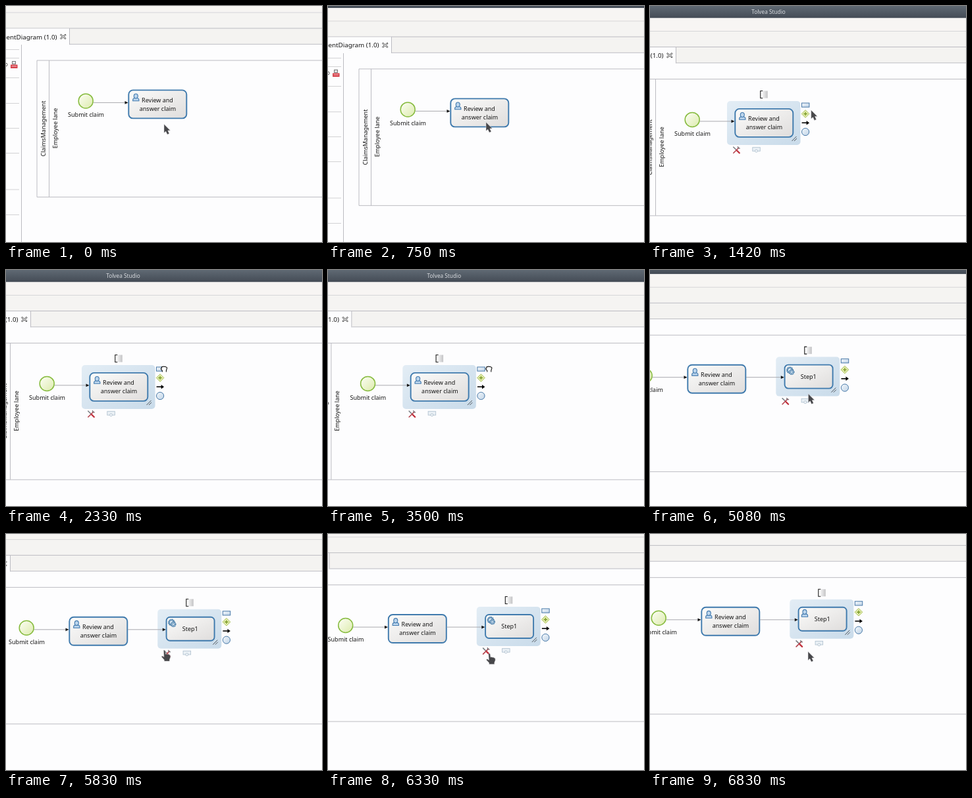
These frames come from a looping animation (480x360 px, 7910 ms). An HTML page:

```html
<!DOCTYPE html>
<html lang="en">
<head>
<meta charset="utf-8">
<title>Adding a step to a process diagram</title>
<style>
  html, body { margin: 0; width: 100%; height: 100%; overflow: hidden; background: #fdfdfe; }
  svg { display: block; width: 100vw; height: 100vh; }
  text { font: 9px "Noto Sans", "Open Sans", sans-serif; fill: #151515; text-anchor: middle; }
  .title { font-size: 8.25px; fill: #d9dce0; }
  .tab { font-size: 9.8px; text-anchor: end; }
  .rule { stroke: #bcbcc2; fill: none; }
  .pale { stroke: #d2d2d4; }
  .flow { stroke: #a9a9ae; }
  .task { fill: url(#taskFill); stroke: #3f7aad; stroke-width: 1.9; }
  .tool { fill: url(#toolFill); stroke: #4879a8; }
  .ghost { fill: #fafbfc; stroke: #b5cddd; stroke-width: 1.3; }
  .cursor { fill: #47474a; stroke: #e9e9ec; stroke-width: .5; stroke-linejoin: round; }
</style>
</head>
<body>
<svg viewBox="0 0 480 360" preserveAspectRatio="none">
  <defs>
    <linearGradient id="barFill" x2="0" y2="1">
      <stop stop-color="#606a74"/><stop offset="1" stop-color="#444b55"/>
    </linearGradient>
    <linearGradient id="taskFill" x2="1" y2="1">
      <stop stop-color="#fbfbfa"/><stop offset="1" stop-color="#dfdddc"/>
    </linearGradient>
    <linearGradient id="startFill" x2="1" y2="1">
      <stop stop-color="#fdfef6"/><stop offset="1" stop-color="#dcebac"/>
    </linearGradient>
    <linearGradient id="toolFill" x2="1" y2="1">
      <stop stop-color="#f4f8fc"/><stop offset="1" stop-color="#bfd3e6"/>
    </linearGradient>
    <linearGradient id="selFill" x2="1" y2="1">
      <stop stop-color="#e3edf5"/><stop offset="1" stop-color="#c9dbea"/>
    </linearGradient>
    <linearGradient id="noteFill" x2="1" y2="0">
      <stop stop-color="#f4f4f4"/><stop offset="1" stop-color="#c3c3c5"/>
    </linearGradient>

    <g id="user" fill="#bcd5ec" stroke="#4079ae" stroke-width="1.1">
      <path d="M-4.6 5.3V3.6Q-4.4 1.2-1.8 1H1.8Q4.4 1.2 4.6 3.6V5.3Z"/>
      <ellipse cy="-2" rx="3" ry="3.5"/>
    </g>
    <g id="gears" fill="#d9e8f4" stroke="#356f9f">
      <circle cx="-.9" cy="-.9" r="4.5" stroke-width="1.7" stroke-dasharray="1.6 .76"/>
      <circle cx="-.9" cy="-.9" r="3.3" stroke-width=".9"/>
      <circle cx="1.8" cy="2" r="3.5" stroke-width="1.6" stroke-dasharray="1.4 .6"/>
      <circle cx="1.8" cy="2" r="1.8" stroke-width=".8"/>
    </g>
    <g id="note">
      <rect x="-2" y="-5.5" width="8" height="11" fill="url(#noteFill)"/>
      <path d="M-1.5-5.5H-5V5.5H-1.5" fill="none" stroke="#1c1c1c" stroke-width="1.1"/>
    </g>
    <g id="wrench" fill="none" stroke-linecap="round">
      <path d="M-4.5-4.5L0 0" stroke="#7b8086" stroke-width="1.6"/>
      <path d="M-4.5 4.5L3.5-3.5" stroke="#b4434d" stroke-width="1.6"/>
      <path d="M2.2-5Q2-2.4 5-2.6" stroke="#6e7378" stroke-width="1.3"/>
      <path d="M1 1L4.5 4.5" stroke="#c2303c" stroke-width="2.3"/>
    </g>
    <g id="message" stroke="#b3c3d1" stroke-width=".9">
      <rect x="-5.7" y="-4" width="11.5" height="5.6" fill="#eaf0f5"/>
      <circle cx="0" cy="1.4" r="2" fill="#f3f6f9"/>
    </g>
    <g id="gateway">
      <path d="M0-5.8L5.8 0 0 5.8-5.8 0Z" fill="#e8f0b4" stroke="#a5bd55"/>
      <path d="M-2.8 0H2.8M0-2.8V2.8" stroke="#7a9a26" stroke-width="1.4"/>
    </g>
    <g id="link">
      <path d="M-5.5 0H2" stroke="#050505" stroke-width="1.6"/>
      <path d="M1.5-3.2L6 0 1.5 3.2Z" fill="#050505"/>
    </g>
    <g id="tip"><path d="M-5-2.4L0 0-5 2.4Z" fill="#151515"/></g>
  </defs>

  <g id="world">
    <rect y="-29" x="-10" width="720" height="19" fill="url(#barFill)"/>
    <text class="title" x="237" y="-16.6">Tolvea Studio</text>
    <rect y="-10" x="-10" width="720" height="20" fill="#f7f5f3"/>
    <rect y="10" x="-10" width="720" height="24" fill="#f5f4f2"/>
    <rect y="34" x="-10" width="720" height="24" fill="#f4f3f1"/>
    <path class="rule" stroke-opacity=".55" d="M-10 10H710"/>
    <path class="rule" d="M-10 34H710M97 58.3H710"/>
    <path d="M-10 34.5H96.5V58.5H-10Z" fill="#fdfdfe"/>
    <path class="rule" d="M96.5 34V59"/>
    <text class="tab" x="77.5" y="50.5">entDiagram (1.0)</text>
    <path d="M83.5 43L86.8 46 90.1 43 91 44.2 88.4 46.8 91 49.4 90.1 50.5 86.8 47.7 83.5 50.5 82.6 49.4 85.2 46.8 82.6 44.2Z" fill="#fff" stroke="#333" stroke-width=".9"/>

    <g id="side">
      <path class="rule" d="M23.5 59V400"/>
      <path class="rule pale" d="M-10 66.5H20M-10 79.5H20M-10 109.5H20M-10 148.5H20M-10 186.5H20M-10 224.5H20M-10 280H20M-10 318.5H20"/>
      <circle cx="0" cy="89.5" r="2.2" fill="none" stroke="#666"/>
      <rect x="9.5" y="84.5" width="5" height="4" fill="#e4e4e6" stroke="#777"/>
      <rect x="7" y="89.5" width="10.5" height="5.5" fill="#d6404a"/>
      <path d="M8.5 92H16" stroke="#f3c8ca"/>
    </g>

    <path class="rule" d="M710 83H47V291.4H710M65.5 83V291.4"/>
    <text transform="translate(59.5 187) rotate(-90)">ClaimsManagement</text>
    <text transform="translate(78 186.5) rotate(-90)">Employee lane</text>

    <g id="selReview"></g>
    <g id="selStep"></g>

    <circle cx="121.2" cy="144.9" r="11" fill="url(#startFill)" stroke="#86bb3e" stroke-width="1.5"/>
    <text x="121.5" y="169.4">Submit claim</text>
    <path class="flow" d="M132.5 147.4H182"/>
    <use href="#tip" x="185.5" y="147.4"/>
    <rect class="task" x="186.3" y="128.4" width="88" height="43" rx="6.5"/>
    <use href="#user" x="197.3" y="139.5"/>
    <text x="230" y="146.8">Review and</text>
    <text x="230.5" y="159.8">answer claim</text>

    <g id="step">
      <path class="flow" d="M275 147.4H329"/>
      <use href="#tip" x="332.8" y="147.4"/>
      <rect class="task" x="333.6" y="128.3" width="73" height="36" rx="5.5"/>
      <use id="gearIcon" href="#gears" x="342.3" y="137.4"/>
      <use id="userIcon" href="#user" x="343" y="137.5"/>
      <text x="369.7" y="149.3">Step1</text>
    </g>

    <rect id="ghost" class="ghost" x="-37" y="-18.5" width="74" height="36.5" rx="6"/>
    <path id="guide" d="M-10 144.6H710" stroke="#c9454c" stroke-width="1.1"/>

    <g id="pointer">
      <path id="arrow" class="cursor" d="M0-.8V12.6L2.8 10.2 5 15 8 13.7 5.9 9H9.6Z"/>
      <path id="fist" fill="#fff" stroke="#111" stroke-width="1.1" d="M-2.6 4.6V2.6L-4.5.2Q-5-1.3-3.4-1.4L-3.5-3Q-2.6-4.4-1.5-3.4-.4-4.6.7-3.4 1.9-4.3 2.8-3 4.6-3.1 4.5-1.2L3.4 2.4V4.6"/>
      <path id="hand" class="cursor" d="M-.9-.3Q.8-1.6 1.8.2L2.4 5 4 4.4 5.4 5.2 7 5 8 6.2 9.3 6.3 9.6 9.5 8.2 13V15.7H0V13.6L-4 9.2Q-4.4 7.3-2.4 7.8L-.3 9.3Z"/>
    </g>
  </g>
</svg>
<script>
const $ = id => document.getElementById(id);
const LOOP = 7910, TICK = 1000 / 12;

// Selection halo with its quick tools
function halo(id, x, y, w, h) {
  const use = (name, dx, dy) => `<use href="#${name}" x="${x + dx}" y="${y + dy}"/>`;
  const r = x + w, b = y + h;
  $(id).innerHTML =
    `<rect x="${x}" y="${y}" width="${w}" height="${h}" rx="5" fill="url(#selFill)"/>` +
    `<path d="M${r - 13} ${b - 6}l7-7M${r - 9.5} ${b - 6}l4-4" stroke="#50555a"/>` +
    use("note", w / 2, -10) + use("wrench", 14.3, h + 7.7) + use("message", 44.5, h + 7.7) +
    `<rect class="tool" x="${r + 2}" y="${y + 3}" width="11.4" height="6.2"/>` +
    use("gateway", w + 7.6, 19.5) + use("link", w + 7.6, 33.2) +
    `<circle class="tool" cx="${r + 7.6}" cy="${y + 47}" r="5.6"/>`;
}
halo("selReview", 174, 116.5, 111.5, 67);
halo("selStep", 320.3, 116.3, 97, 60);

const ease = {
  both: p => (1 - Math.cos(Math.PI * p)) / 2,
  into: p => p * p,
  out: p => 1 - (1 - p) * (1 - p)
};

// Rows: tick, x, y, easing used to arrive there
const view = [
  [0, 0, 0], [4, 0, 0], [11, 0, 16], [12, 0, 16], [17, -57, 28.5], [19, -61, 28.5, "out"],
  [22, -61, 28.5], [26, -59, 28.5], [41, -59, 28.5], [51, -126, 28.5], [54, -129, 28.5, "out"],
  [57, -129, 28.5], [61, -129, 16.3, "into"], [65, -129, -1.6, "out"], [70, -90, -1.6],
  [73, -90, -1.6], [82, -108, -16.6]
];
const mouse = [
  [0, 240, 181], [4, 240, 181], [9, 240, 165], [12, 240, 165], [17, 301.7, 131], [22, 301, 124],
  [26, 299, 122.5], [41, 299, 122.5], [42, 305, 122.5, "into"], [50, 369.2, 146.5], [55, 369.2, 146.5],
  [61, 369.4, 173.3], [64, 369.4, 182.5, "out"], [65, 369.4, 182.5], [69, 330.3, 180],
  [73, 330.3, 180], [79, 348, 196.7]
];

function at(rows, k) {
  const i = rows.findIndex(row => row[0] > k);
  if (i < 0) return rows[rows.length - 1].slice(1, 3);
  const a = rows[i - 1], b = rows[i];
  const p = ease[b[3] || "both"]((k - a[0]) / (b[0] - a[0]));
  return [a[1] + (b[1] - a[1]) * p, a[2] + (b[2] - a[2]) * p];
}

function place(id, [x, y]) { $(id).setAttribute("transform", `translate(${x} ${y})`); }
function show(id, on) { $(id).style.display = on ? "" : "none"; }

function draw(now) {
  const k = Math.floor((now % LOOP + 5) / TICK);
  const within = (from, to) => k >= from && k < to;
  const spot = at(mouse, k);
  place("world", at(view, k));
  place("pointer", spot);
  place("ghost", spot);

  const fist = within(28, 56), hand = within(68, 80);
  show("fist", fist);
  show("hand", hand);
  show("arrow", !fist && !hand);
  show("selReview", within(10, 56));
  show("ghost", within(43, 56));
  show("guide", within(49, 56));
  show("selStep", k >= 56);
  show("step", k >= 56);
  show("gearIcon", k < 80);
  show("userIcon", k >= 80);
}

let start;
function loop(now) {
  start ??= now;
  draw(Math.max(0, now - start));
  requestAnimationFrame(loop);
}
draw(0);
requestAnimationFrame(loop);
</script>
</body>
</html>
```
